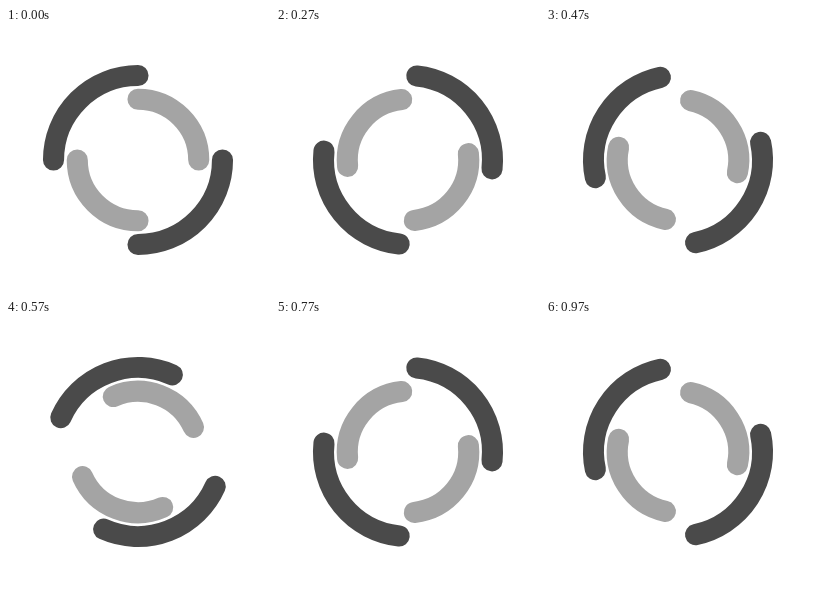
An HTML page that plays this animation: 264 px wide and 264 px high, repeating every 1 s.

```html
<!DOCTYPE html>
<html lang="en">
<head>
<meta charset="utf-8">
<title>Double ring spinner</title>
<style>
  html, body { margin: 0; width: 100%; height: 100%; overflow: hidden; background: #fff; }
  svg { display: block; width: 100vw; height: 100vh; }
  path { fill: none; stroke-width: 8; stroke-linecap: round; }
</style>
</head>
<body>
<svg viewBox="-50 -50 100 100">
  <path id="outer" stroke="#4a4a4a" d="M-32 0A32 32 0 0 1 0-32M32 0A32 32 0 0 1 0 32"/>
  <path id="inner" stroke="#a4a4a4" d="M0-23A23 23 0 0 1 23 0M0 23A23 23 0 0 1-23 0"/>
</svg>
<script>
  const outer = document.getElementById('outer');
  const inner = document.getElementById('inner');
  const start = performance.now();

  // 30 steps a second, each starting on the nearest 10 ms
  function draw() {
    const t = Math.max(0, performance.now() - start) % 1000;
    const step = Math.floor((Math.floor(t / 10) + 0.34) * 0.3);
    const angle = step * 12;
    outer.setAttribute('transform', `rotate(${angle})`);
    inner.setAttribute('transform', `rotate(${-angle})`);
    requestAnimationFrame(draw);
  }
  draw();
</script>
</body>
</html>
```
